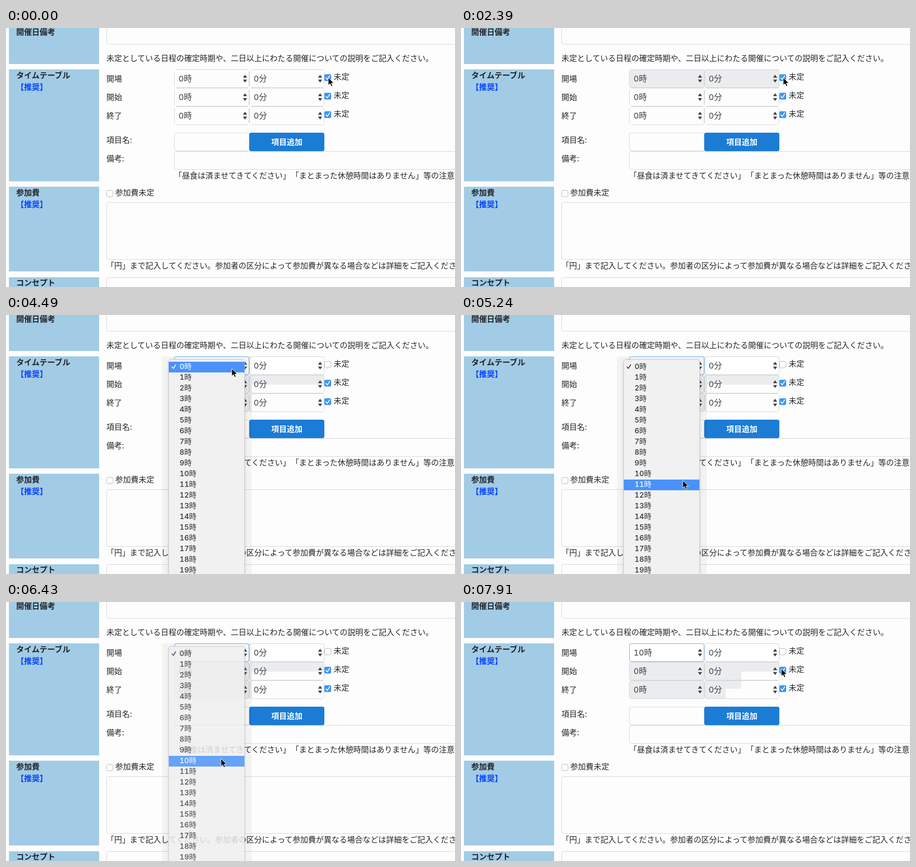
An HTML page that plays this animation: 921 by 532 pixels, repeating every 8000 ms.

```html
<!DOCTYPE html>
<html lang="ja">
<head>
<meta charset="utf-8">
<title>タイムテーブル入力</title>
<style>
html, body { margin: 0; width: 100%; height: 100%; overflow: hidden; background: #fdfdfd; }
svg { display: block; width: 921px; height: 532px; }
text {
  font: 16px "Noto Sans CJK JP", "Noto Sans CJK", sans-serif;
  fill: #212529; white-space: pre; text-spacing-trim: space-all;
}
text.b { font-weight: 700; }
text.num {
  font-family: Inter, "Noto Sans CJK JP", "Noto Sans CJK", sans-serif;
  font-size: 16.5px; font-variant-numeric: tabular-nums; fill: #3a3f44;
}
text.item { font-size: 15px; fill: #303030; font-weight: 500; }
.field { fill: #fdfdfd; stroke: #d3d5d7; }
</style>
</head>
<body>
<svg id="stage" viewBox="0 0 921 532" xmlns="http://www.w3.org/2000/svg"></svg>
<script>
const LOOP = 8000;
const ROWS = [85, 123, 161];
const COLS = [345, 499];
const GREY = '#ebecee';
const ITEM_H = 22;

const text = (x, mid, s, attrs = '') => `<text x="${x}" y="${mid + 6}" ${attrs}>${s}</text>`;
const bold = (x, mid, s, fill = '#212529') => text(x, mid, s, `class="b" style="fill:${fill}"`);
const box = (x, y, w, h, attrs = 'class="field"') =>
  `<rect x="${x + .5}" y="${y + .5}" width="${w}" height="${h}" rx="4" ${attrs}/>`;
const panel = (y, h) => `<rect x="6" y="${y}" width="185" height="${h}" fill="#a2cbe5"/>`;
const tick = (x, y, color) =>
  `<path d="M${x} ${y}l2.8 3.2 4.8-7.4" fill="none" stroke="${color}" stroke-width="1.7" stroke-linecap="round" stroke-linejoin="round"/>`;

function checkbox(x, y, id, on) {
  return `<rect x="${x + .5}" y="${y + .5}" width="13" height="13" rx="3" fill="#fff" stroke="#b4b4b4"/>` +
    `<g id="${id}" ${on ? '' : 'display="none"'}><rect x="${x}" y="${y}" width="14" height="14" rx="3" fill="#3f97f6"/>` +
    tick(x + 3.3, y + 7.4, '#fff') + '</g>';
}

// Select outline whose rounded corners are missing
function openBox(x, y) {
  return `<path d="M${x + 4} ${y + .5}h148M${x + 4} ${y + 37.5}h148M${x + .5} ${y + 4}v31M${x + 153.5} ${y + 4}v31" stroke="#d3d5d7"/>`;
}

const arrows = (x, y) =>
  `<path d="M${x + 141} ${y + 17}l4.3-6 4.3 6zM${x + 141} ${y + 21}l4.3 6 4.3-6z" fill="#40464c"/>`;

const eachSelect = fn => ROWS.map((y, r) => COLS.map((x, c) => fn(x, y, r, c)).join('')).join('');

const form = [
  panel(-10, 84), panel(85, 230), panel(326, 174), panel(512, 30),
  bold(21, 8, '開催日備考'), bold(21, 97, 'タイムテーブル'), bold(21, 121, '【推奨】', '#0040ff'),
  bold(21, 338, '参加費'), bold(21, 362, '【推奨】', '#0040ff'), bold(21, 523, 'コンセプト'),
  box(206, -20, 800, 53), box(206, 358, 800, 117), box(206, 512, 800, 60),
  text(206, 62, '未定としている日程の確定時期や、二日以上にわたる開催についての説明をご記入ください。'),
  ['開場', '開始', '終了'].map((s, i) => text(206, 104 + i * 38, s)).join(''),
  text(206, 230, '項目名:'), text(206, 268, '備考:'),
  box(345, 215, 153, 37), box(345, 253, 700, 37),
  '<rect x="499" y="215" width="154" height="38" rx="4" fill="#1b7cd6"/>',
  text(576, 234, '項目追加', 'class="b" text-anchor="middle" style="fill:#fff"'),
  text(345, 303, '「昼食は済ませてきてください」'),
  text(585, 303, '「まとまった休憩時間はありません」等の注意'),
  checkbox(206, 333, 'fee', false), text(224, 338, '参加費未定'),
  text(206, 488, '「円」まで記入してください。参加者の区分によって参加費が異なる場合などは詳細をご記入ください')
].join('');

const selects =
  eachSelect(openBox) +
  `<g id="first">${COLS.map(x => box(x, 85, 153, 37, 'stroke="#d3d5d7"')).join('')}</g>` +
  `<g clip-path="url(#shown)">${eachSelect((x, y, r) => r ? box(x, y, 153, 37, `fill="${GREY}" stroke="#d3d5d7"`) : '')}</g>` +
  box(345, 85, 153, 37, 'id="focus" fill="none" stroke="#66b0f2"') +
  eachSelect((x, y, r, c) =>
    text(x + 9, y + 19, c ? '0分' : '0時', `class="num" ${r + c ? '' : 'id="hour"'}`) + arrows(x, y)) +
  ROWS.map((y, r) => checkbox(653, y + 10, 'check' + r, true) + text(672, y + 15, '未定')).join('');

const items = Array.from({ length: 20 }, (_, i) =>
  text(356, 105 + i * ITEM_H - .5, i + '時', 'class="num item"')).join('');

const popup = `<path id="halo" d="M320 85H504V532H320z" fill="#000" opacity=".04"/>
  <g id="popup">
  <rect x="333.5" y="91.5" width="156" height="480" rx="5" fill="#f1f1f1" stroke="#c4c4c4" filter="url(#shade)"/>
  <rect id="bar" x="334" width="155" height="22" fill="#4a92fa"/>
  ${items}<g id="mark">${tick(340.5, 106.5, 'currentColor')}</g></g>`;

const pointer = '<path id="cursor" d="M0 0v15.5l3.6-3.3 2.4 5.6 2.6-1.1-2.3-5.4h5z" fill="#000" stroke="#fff"/>';

document.getElementById('stage').innerHTML = `<defs>
  <clipPath id="shown"><path id="region"/></clipPath>
  <filter id="shade" x="-20%" y="-10%" width="140%" height="120%">
    <feDropShadow dx="0" dy="2" stdDeviation="3" flood-opacity=".12"/></filter>
  </defs><rect width="921" height="532" fill="#fdfdfd"/>` + form + selects + popup + pointer;

const $ = id => document.getElementById(id);
const show = (id, on) => $(id).setAttribute('display', on ? 'inline' : 'none');
const labels = [...document.querySelectorAll('.item')];

// Pointer stops: time, x, y
const STOPS = [
  [0, 661, 102], [3440, 618, 123], [3590, 560, 124], [3740, 506, 122], [3890, 474, 114], [4040, 463, 110],
  [5090, 460, 218], [5240, 455, 340], [5390, 453, 354], [5540, 450, 350], [5690, 446, 340], [5840, 443, 330], [5980, 441, 322],
  [6570, 458, 300], [6720, 530, 200], [6870, 562, 159], [7020, 562, 78],
  [7320, 640, 86], [7470, 706, 98], [7620, 698, 116], [7770, 672, 131], [7910, 657, 137]
];

// Part of the lower selects already repainted as disabled
function region(t, x) {
  if (t < 3440) return '';
  const left = t < 4190 ? x : 345;
  let d = `M${left} 123H660V143H${left}z`;
  if (t >= 4190) d += `M340 123H${t < 6720 ? 504 : 543}V200H340z`;
  if (t >= 6870) d += 'M540 123H575V178H540z';
  return d;
}

function firstFill(t) {
  if (t < 1040) return '#fdfdfd';
  if (t < 2240 || t >= 3290) return '#fff';
  return t < 2390 || t >= 3140 ? '#f4f5f7' : GREY;
}

function draw(t) {
  const [, x, y] = STOPS.findLast(s => s[0] <= t);
  $('cursor').setAttribute('transform', `translate(${x} ${y})`);
  $('region').setAttribute('d', region(t, x));

  show('first', t >= 1040);
  $('first').setAttribute('fill', firstFill(t));
  show('check0', t < 1040 || (t >= 2240 && t < 3140));
  show('focus', t >= 4190);
  $('hour').textContent = t >= 6570 ? '10時' : '0時';

  const blink = t >= 6280 && t < 6430;
  const active = blink ? -1 : Math.floor((y - 96) / ITEM_H);
  const open = t >= 4190 && t < 6570;
  show('halo', open);
  show('popup', open);
  $('popup').setAttribute('opacity', t >= 6430 ? .83 : 1);
  show('bar', active >= 0);
  $('bar').setAttribute('y', 96 + active * ITEM_H);
  labels.forEach((el, i) => el.style.fill = i === active ? '#fff' : '');
  $('mark').style.color = active === 0 ? '#fff' : '#303030';
}

const start = performance.now();
function loop() {
  draw((performance.now() - start) % LOOP);
  requestAnimationFrame(loop);
}
loop();
</script>
</body>
</html>
```
